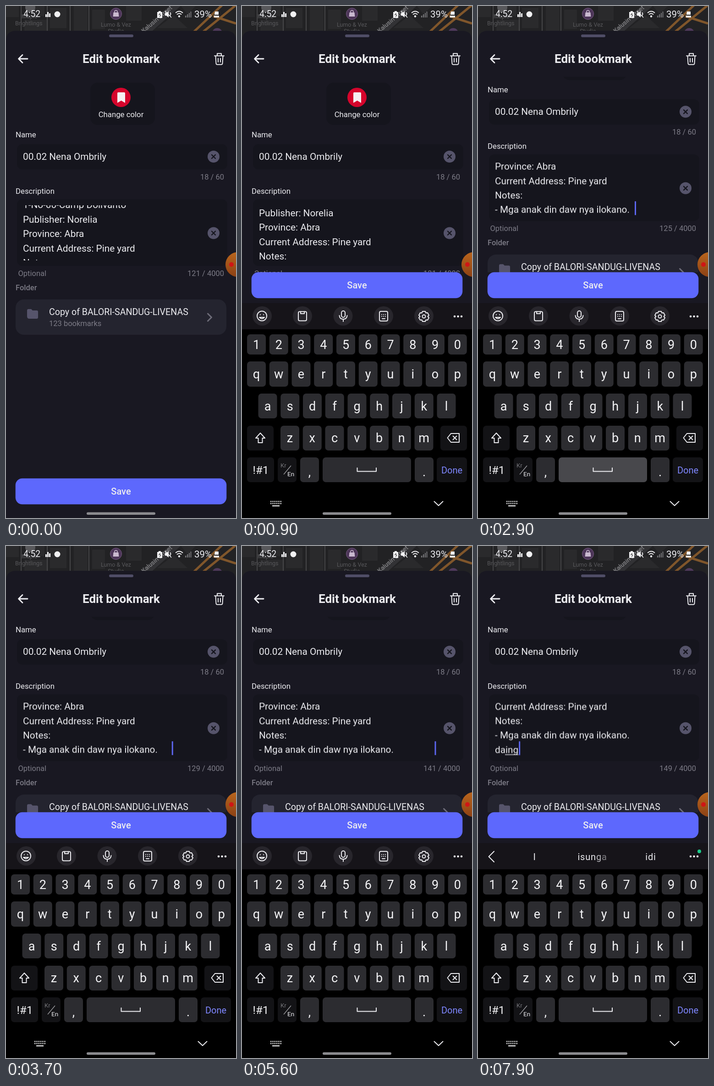
Write an HTML page that moves like this. It is 502x1115 px and loops after 8 s.

```html
<!DOCTYPE html>
<html lang="en">
<head>
<meta charset="utf-8">
<title>Edit bookmark</title>
<style>
  html, body { margin: 0; width: 100%; height: 100%; overflow: hidden; background: #191822; }
  svg { display: block; width: 502px; height: 1115px; font-family: Roboto, sans-serif; }
  text { fill: #ececf0; white-space: pre; }
  .body { font-size: 20.75px; }
  .label { font-size: 16.8px; }
  .small { font-size: 16.5px; fill: #7c7b86; }
  .mid { text-anchor: middle; }
  .end { text-anchor: end; }
  .map { font-size: 12.5px; }
  .map text { fill: #58585b; }
  .line { fill: none; stroke: #ececf0; stroke-width: 2; stroke-linecap: round; stroke-linejoin: round; }
  .field { fill: #15151d; }
  .key { fill: #2c2c30; }
  .dark { fill: #131316; }
  .lit { fill: #48484c; }
  .cap { font-size: 27px; fill: #f4f4f6; text-anchor: middle; }
  .hint { font-size: 20px; letter-spacing: .8px; text-anchor: middle; }

  .keyboard, .save, .page, .lines, .tools, .hints { animation: 8s linear infinite; }
  .keyboard { animation-name: keyboard; }
  .save { animation-name: save; }
  .page { animation-name: page; }
  .lines { animation-name: lines; }
  .tools { animation-name: tools; }
  .hints { animation-name: hints; }
  @keyframes keyboard {
    0%, 1.8% { transform: translateY(468px); animation-timing-function: cubic-bezier(.2, .7, .3, 1); }
    7%, 100% { transform: none; }
  }
  @keyframes save {
    0%, 1.8% { transform: translateY(449px); animation-timing-function: cubic-bezier(.2, .7, .3, 1); }
    7%, 100% { transform: none; }
  }
  @keyframes page {
    0%, 11.6% { transform: none; animation-timing-function: ease-out; }
    18%, 100% { transform: translateY(-97.7px); }
  }
  @keyframes lines {
    0%, 10% { transform: none; }
    11%, 11.6% { transform: translateY(-14px); }
    15%, 85.62% { transform: translateY(-49px); }
    85.63%, 100% { transform: translateY(-80.4px); }
  }
  @keyframes tools {
    0%, 85.62% { opacity: 1; }
    85.63%, 100% { opacity: 0; }
  }
  @keyframes hints {
    0%, 85.62% { opacity: 0; }
    85.63%, 100% { opacity: 1; }
  }
</style>
</head>
<body>
<svg viewBox="0 0 502 1115">
  <defs>
    <clipPath id="pageClip"><path d="M0 154H502V1115H0Z"/></clipPath>
    <clipPath id="textClip"><path d="M24 434H440V553.5H24Z"/></clipPath>
    <g id="clear">
      <circle r="13" fill="#56546b"/>
      <path d="M-4-4L4 4M4-4L-4 4" stroke="#15151d" stroke-width="2.4" stroke-linecap="round"/>
    </g>
    <linearGradient id="orange" x2="0" y2="1">
      <stop stop-color="#b9651d"/><stop offset="1" stop-color="#8c4115"/>
    </linearGradient>
  </defs>

  <rect width="502" height="80" fill="#222224"/>
  <path fill="#2a2a2c" d="M0 0H28V24H0ZM40 30H92V54H40ZM62 0H84V22H62ZM96 4H132V48H96ZM148 0H178V54H148ZM188 8H216V50H188ZM262 0H296V32H262ZM330 48L366 20 396 48ZM382 0H414L396 18Z"/>
  <path d="M33 0V54M140 0V54M181 0V54M90 0V54" stroke="#454547" stroke-width="2" fill="none"/>
  <path d="M296 64L378-8" stroke="#323235" stroke-width="16"/>
  <path d="M408 58L476-6M428 58L502-2M452 22L502 38" stroke="#80562b" stroke-width="5" fill="none"/>
  <circle cx="53" cy="3" r="11" fill="#58585b"/>
  <circle cx="461" cy="59" r="11" fill="#503a5c"/>
  <g class="map">
    <text x="34" y="27">Maple</text>
    <text x="20" y="42">Brightlings</text>
    <text x="240" y="45" class="mid">Lumo &amp; Vez</text>
    <text x="240" y="59" class="mid">Studio</text>
    <text transform="translate(300 59) rotate(-40)" font-size="13.5" style="fill:#929294">Kalusin Street</text>
  </g>
  <circle cx="240" cy="17" r="12.5" fill="#4c3558" stroke="#785b83"/>
  <path d="M234.500 14H245.500L246.500 23H233.500Z" fill="#c9b9cf"/>
  <path d="M237 14V12.500A3 3 0 0 1 243 12.500V14" fill="none" stroke="#c9b9cf" stroke-width="1.500"/>

  <g fill="#f2f2f4">
    <text x="38" y="24" font-size="19.3">4:52</text>
    <text x="411" y="24.5" font-size="20.5">39%</text>
    <path d="M86 18H89V24H86ZM90 13H93V24H90ZM94 16H97V24H94Z"/>
    <circle cx="112" cy="18" r="6.5"/>
    <path d="M330 13H333V11H338V13H341V26H330ZM347 15H350L355 11V25L350 21H347ZM454 21H465V25H454ZM456 12H464V19H455Z"/>
    <path d="M333 20L336 16V20H338L335 24" stroke="#222" fill="none"/>
    <path d="M347 11L361 25M358 14Q361 18 358 21" stroke="#f2f2f4" stroke-width="1.7" fill="none"/>
    <path d="M370 15Q378 8 386 15M373 18.5Q378 14 383 18.5" stroke="#f2f2f4" stroke-width="2" fill="none"/>
    <circle cx="378" cy="22.5" r="2.2"/>
    <path d="M391 21H393.500V25H391ZM395 18H397.500V25H395ZM399 15H401V25H399ZM402.500 12H404.500V25H402.500Z" fill="#737376"/>
  </g>

  <path d="M0 1115V76Q0 54 22 54H480Q502 54 502 76V1115Z" fill="#191822"/>
  <rect x="225" y="62" width="53" height="6" rx="3" fill="#4f4d66"/>
  <path class="line" style="stroke-width:2.8" d="M47 115H28M36 106.500L27.500 115 36 123.500"/>
  <text x="251.500" y="123.500" class="mid" font-size="26" font-weight="700">Edit bookmark</text>
  <path class="line" d="M455 108.500H476M461 108V103.500H470V108M457.500 109L458.500 125Q458.700 127.500 461 127.500H470Q472.300 127.500 472.500 125L473.500 109M463 114V122M468 114V122"/>

  <g clip-path="url(#pageClip)">
    <g class="page">
      <rect class="field" x="184" y="167" width="141" height="92" rx="16"/>
      <circle cx="251" cy="199" r="21" fill="#d5052c"/>
      <path d="M243 190Q243 188 245 188H258Q260 188 260 190V211L251.500 206 243 211Z" fill="#f5f0f2"/>
      <text class="label mid" x="251" y="242">Change color</text>

      <text class="label" x="21" y="286">Name</text>
      <rect class="field" x="24" y="301" width="459" height="55" rx="12"/>
      <text class="body" x="37" y="334.500">00.02 Nena Ombrily</text>
      <use href="#clear" x="453" y="328"/>
      <text class="small end" x="476" y="378">18 / 60</text>

      <text class="label" x="21" y="408.500">Description</text>
      <rect class="field" x="24" y="421" width="459" height="145" rx="12"/>
      <g clip-path="url(#textClip)"><g class="lines body" id="lines"></g></g>
      <use href="#clear" x="453" y="494.500"/>
      <text class="small" x="26.500" y="588">Optional</text>
      <text class="small end" x="476" y="588" id="count"></text>

      <text class="small" x="21" y="618.500" font-weight="500">Folder</text>
      <rect x="21" y="639" width="460" height="77" rx="18" fill="#24242f"/>
      <path d="M46 663Q46 660 49 660H55L58 663H67Q70 663 70 666V678Q70 681 67 681H51Q46 681 46 676Z" fill="#56546b"/>
      <text x="94" y="672.500" font-size="19.600">Copy of BALORI-SANDUG-LIVENAS</text>
      <text class="small" x="94" y="696.500">123 bookmarks</text>
      <path class="line" style="stroke:#6d6c78;stroke-width:3" d="M440.500 670L448.500 678 440.500 686"/>
    </g>
  </g>

  <g class="save">
    <rect y="580" width="502" height="540" fill="#191822"/>
    <rect x="20.700" y="579.700" width="460.600" height="56.600" rx="15" fill="#5d68fd"/>
    <text x="251" y="615" class="mid" font-size="20" font-weight="500">Save</text>
  </g>

  <circle cx="506" cy="563" r="27" fill="url(#orange)"/>
  <circle cx="492" cy="563" r="5" fill="#cf1616"/>

  <g class="keyboard">
    <rect y="647" width="502" height="57" fill="#161419"/>
    <rect y="704" width="502" height="411"/>
    <g class="tools">
      <g fill="#28262c" id="discs"></g>
      <g class="line">
        <circle cx="43.500" cy="675" r="10.500"/>
        <path d="M38 678Q43.500 684 49 678ZM40 672V672.500M47 672V672.500"/>
        <rect x="123" y="665.500" width="18" height="20" rx="3"/>
        <path d="M128 665.500V670H136V665.500"/>
        <rect x="217" y="664" width="8" height="14" rx="4"/>
        <path d="M212.500 674Q213 682 221 682T229.500 674M221 682V687"/>
        <rect x="300" y="665" width="18" height="21" rx="3"/>
        <path d="M305 672H305.100M309 672H309.100M313 672H313.100M305 676H305.100M309 676H309.100M313 676H313.100M306 681H312"/>
        <path d="M394 665H400L401.500 668.500 405 668 408 673.500 405.500 676 408 679 405 684 401.500 683.500 400 687H394L392.500 683.500 389 684 386 679 388.500 676 386 673.500 389 668 392.500 668.500Z"/>
        <circle cx="397" cy="676" r="3.500"/>
      </g>
    </g>
    <g class="hints">
      <path class="line" d="M35 665L23.500 676.500 35 688"/>
      <text class="hint" x="123.500" y="684">I</text>
      <text class="hint" x="249.500" y="684">isun<tspan fill-opacity=".75">g</tspan><tspan fill-opacity=".5">a</tspan></text>
      <text class="hint" x="377" y="684">idi</text>
      <circle cx="483" cy="665" r="4" fill="#1ccc8b"/>
    </g>
    <path class="line" style="stroke-width:4.500" d="M464 676H464.100M471.500 676H471.600M479 676H479.100"/>

    <g id="keys"></g>
    <path class="line" d="M40 930L50 941H44.500V951H35.500V941H30ZM456 931H474V950H456L448.500 940.500ZM460.500 936.500L468.500 944.500M468.500 936.500L460.500 944.500"/>
    <path class="line" d="M251.500 1006V1013.500H293V1006"/>
    <text class="cap" x="41" y="1018.500" style="font-size:24.500px">!#1</text>
    <text x="84" y="1005" font-size="13" style="fill:#76767a">Kr</text>
    <text x="99" y="1024" font-size="13.500">En</text>
    <path d="M91 1020L107 1001" stroke="#a5a5a9" stroke-width="1.200"/>
    <text class="mid" x="458" y="1018" font-size="20" style="fill:#7f87ff">Done</text>
    <path d="M62 1079H86M62 1083.500H86" stroke="#dededf" stroke-width="2.500" stroke-dasharray="2.500 1.800"/>
    <path d="M66 1088.500H82" stroke="#dededf" stroke-width="2.500"/>
    <path class="line" d="M419.500 1079L429 1088 438.500 1079"/>
  </g>
  <rect x="176" y="1102.500" width="150" height="5.500" rx="2.700" fill="#8b8b8f"/>
</svg>

<script>
  const $ = id => document.getElementById(id);
  function add(parent, tag, attrs, text = '') {
    const el = document.createElementNS('http://www.w3.org/2000/svg', tag);
    for (const name in attrs) el.setAttribute(name, attrs[name]);
    el.textContent = text;
    return parent.appendChild(el);
  }

  for (const x of [44, 132, 220.5, 309, 397]) add($('discs'), 'circle', { cx: x, cy: 675, r: 21 });

  const keys = {};
  function addKey(x, y, width, height, kind = 'key') {
    return add($('keys'), 'rect', { x, y, width, height, rx: 7, class: kind });
  }
  function addRow(chars, left, y, height, baseline) {
    [...chars].forEach((char, i) => {
      const x = left + i * 48.75;
      keys[char] = addKey(x, y, 41, height);
      add($('keys'), 'text', { x: x + 20.5, y: baseline, class: 'cap' }, char);
    });
  }
  addRow('1234567890', 11, 715, 44, 747);
  addRow('qwertyuiop', 11, 774, 55, 811);
  addRow('asdfghjkl', 35.5, 844, 54, 881);
  addRow('zxcvbnm', 84, 914, 54, 950);
  addRow(',', 127, 983, 54, 1024);
  addRow('.', 377, 983, 54, 1024);
  keys[' '] = addKey(176, 983, 193, 54);
  for (const [x, y, w] of [[11, 914, 58], [433, 914, 58], [11, 983, 59], [78, 983, 41], [425, 983, 66]])
    addKey(x, y, w, 54, 'dark');

  const lineY = i => 440.3 + 31.4 * i;
  const lines = ['1-No-00-Camp Dolivanto', 'Publisher: Norelia', 'Province: Abra',
    'Current Address: Pine yard', 'Notes:', '', '']
    .map((text, i) => add($('lines'), 'text', { x: 37, y: lineY(i) }, text));
  const underline = add($('lines'), 'rect', { x: 59, y: lineY(6) + 3, height: 1.5, fill: '#d8d8dc' });
  const caret = add($('lines'), 'rect', { width: 3, height: 30, fill: '#5d66f0' });

  const word = 'daing';
  const wordTimes = [6850, 7050, 7250, 7450, 7750];

  // Runs of space taps: start time, interval, number of taps.
  const spaceTaps = [[2250, 200, 4], [3027, 177, 9], [4593, 143, 7], [5660, 210, 3]]
    .flatMap(([from, step, taps]) => Array.from({ length: taps }, (_, i) => from + i * step));

  const pressed = (t, time) => t >= time && t < time + 100;
  const paintKey = (char, lit) => keys[char].setAttribute('class', lit ? 'lit' : 'key');

  function render(t) {
    const typed = wordTimes.filter(time => t >= time).length;
    const count = 121 + spaceTaps.filter(time => t >= time).length;
    $('count').textContent = `${count + typed} / 4000`;
    lines[5].textContent = '- Mga anak din daw nya ilokano' + (count > 122 ? '.' : '');
    lines[6].textContent = word.slice(0, typed);

    const wordEnd = 37 + (typed ? lines[6].getComputedTextLength() : 0);
    const x = typed ? wordEnd + 1 : Math.min(422, 343.5 + (count - 125) * 4.94) - 1.5;
    const shown = (t > 1000 && t < 1750) || (t >= 2250 && t < 6650) || typed;
    caret.setAttribute('x', x);
    caret.setAttribute('y', lineY(typed ? 6 : 5) - 25.3);
    caret.setAttribute('opacity', shown ? 1 : 0);
    underline.setAttribute('width', typed > 2 ? wordEnd - 59 : 0);

    paintKey(' ', spaceTaps.some(time => pressed(t, time)));
    [...word].forEach((char, i) => paintKey(char, pressed(t, wordTimes[i])));
  }

  let start;
  function tick(now) {
    start ??= now;
    render((now - start) % 8000);
    requestAnimationFrame(tick);
  }
  render(0);
  requestAnimationFrame(tick);
</script>
</body>
</html>
```
